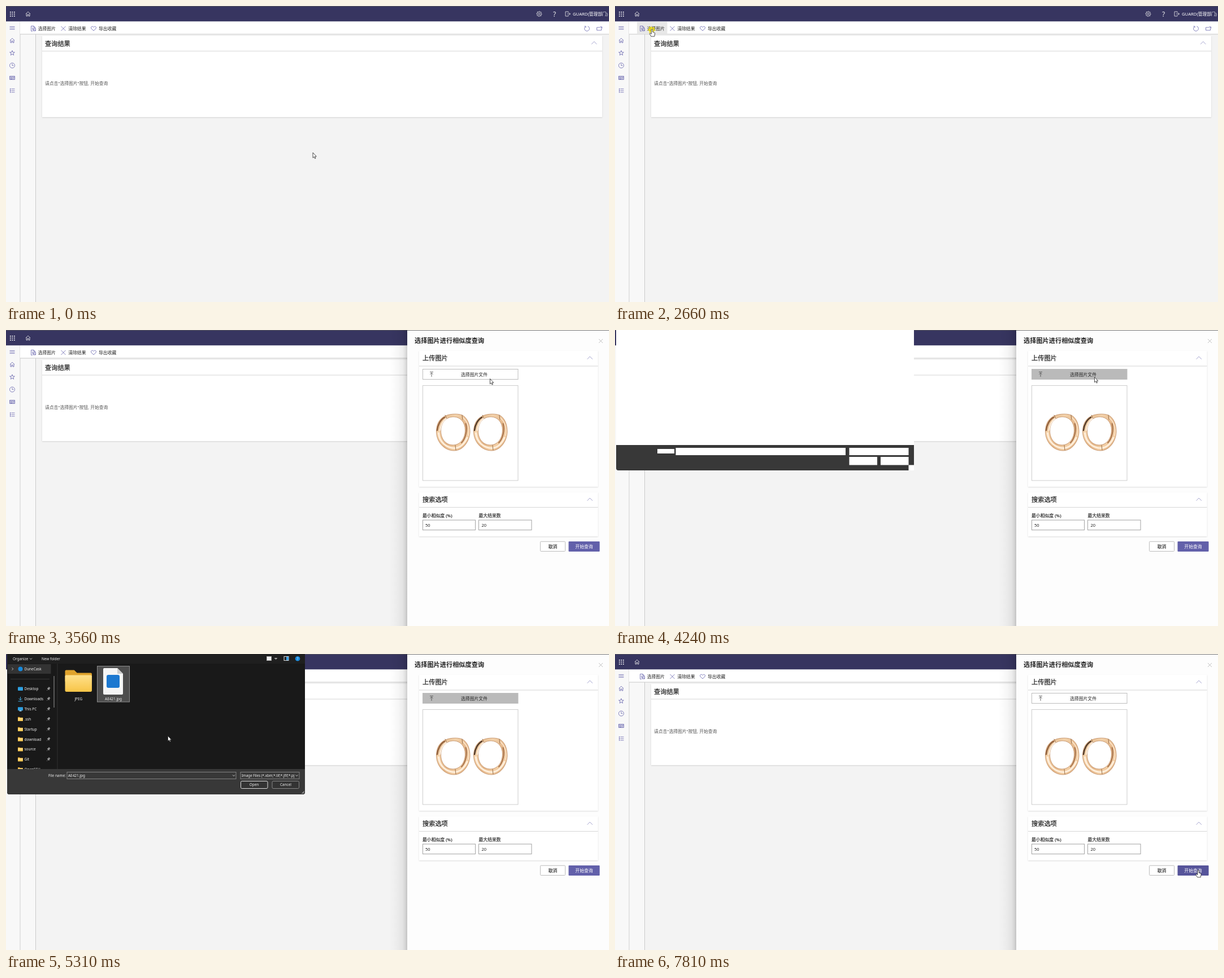
Write an HTML page that moves like this. It is 1067 px wide and 525 px high and loops after 8000 ms.

```html
<!DOCTYPE html>
<html lang="zh">
<head>
<meta charset="utf-8">
<title>图片查询</title>
<style>
html, body { margin: 0; width: 100%; height: 100%; overflow: hidden; background: #f3f3f3; }
svg { display: block; width: 100vw; height: 100vh; }
text { font: 7.85px "Noto Sans", "Noto Sans CJK SC", "Noto Sans CJK", sans-serif; fill: #222; white-space: pre; }
.cjk { font-family: "Noto Sans CJK SC", "Noto Sans CJK", sans-serif; }
.head { font-size: 11.2px; stroke: #222; stroke-width: .25; }
.bold { font-weight: 700; stroke: none; }
.label { stroke: #222; stroke-width: .15; }
.win { font-size: 6.4px; fill: #eee; }
.mid { text-anchor: middle; }
.icon { fill: none; stroke: #6563ad; stroke-width: .8; }
.light { stroke: #eee; }
.thin { stroke: #7f7dbb; stroke-width: .7; }
.gray { stroke: #999; stroke-width: .6; }
.card { fill: #fff; filter: drop-shadow(0 1px 1px #0002); }
</style>
</head>
<body>
<svg id="stage" viewBox="0 0 1067 525" preserveAspectRatio="none"></svg>
<script>
const rect = (x, y, w, h, fill, extra = '') =>
  `<rect x="${x}" y="${y}" width="${w}" height="${h}" fill="${fill}" ${extra}/>`;
const box = (x, y, w, h, fill, stroke, extra = '') =>
  rect(x + .5, y + .5, w - 1, h - 1, fill, `stroke="${stroke}" ${extra}`);
const text = (x, y, s, cls = 'cjk', extra = '') => `<text x="${x}" y="${y}" class="${cls}" ${extra}>${s}</text>`;
const icon = (x, y, d, cls = '') => `<path class="icon ${cls}" transform="translate(${x} ${y})" d="${d}"/>`;
const card = (x, y, w, h, line) =>
  rect(x, y, w, h, '#fff', 'class="card"') + rect(x, line, w, 1, '#d6d6d6') + icon(x + w - 14.3, y + 12.3, CHEVRON, 'thin');
const group = (id, body) => `<g id="${id}">${body}</g>`;
const circle = r => `M${-r},0a${r},${r} 0 1 0 ${2 * r},0a${r},${r} 0 1 0 ${-2 * r},0`;

const CHEVRON = 'M-4.6,2.5L0,-2.3L4.6,2.5';
const HOME = 'M-4,0L0,-3.8L4,0M-3,-1V4H-1V1H1V4H3V-1';
const CROSS = 'M-4,-4L4,4M4,-4L-4,4';
const star = 'M' + Array.from({length: 10}, (_, i) => {
  const r = i % 2 ? 1.9 : 4.6, a = i * Math.PI / 5;
  return [r * Math.sin(a), -r * Math.cos(a)].map(v => v.toFixed(1));
}).join('L') + 'Z';
const gear = 'M' + Array.from({length: 32}, (_, i) => {
  const r = i % 4 < 2 ? 4.6 : 3.5, a = i * Math.PI / 16;
  return [r * Math.cos(a), r * Math.sin(a)].map(v => v.toFixed(1));
}).join('L') + 'Z' + circle(1.6);

function page() {
  let dots = '';
  for (let i = 0; i < 9; i++) dots += rect(7 + i % 3 * 3.5, 10 + Math.floor(i / 3) * 3.5, 1.7, 1.7, '#fff');
  return rect(0, 0, 1067, 525, '#f3f3f3') +
    rect(0, 27, 52, 498, '#f8f8f8') + rect(24.5, 27, 1, 498, '#cfcfcf') + rect(52, 50, 1, 475, '#cacaca') +
    rect(25, 27, 1042, 23, '#fff') + rect(25, 49.5, 1042, 1, '#cacaca') +
    rect(0, 0, 1067, 27.3, '#373560') + rect(0, 0, 1067, 1, '#55555f') + dots +
    icon(39, 14, HOME, 'light') + icon(943.5, 14, gear, 'light') +
    `<text x="970.5" y="18.5" class="mid" style="font-size:12px;fill:#eee">?</text>` +
    icon(994, 14, 'M1,-2V-4H-4V4H1V2M-1,0H4.5M2.5,-2L4.5,0L2.5,2', 'light') +
    text(1003, 17, 'GUARD(管理部门)', '', 'style="font-size:7.7px;fill:#fff"') +
    icon(11, 39, 'M-4.5,-2.5H4.5M-4.5,0H4.5M-4.5,2.5H4.5') + icon(11, 61, HOME) + icon(11, 83.5, star) +
    icon(11, 105.5, circle(4.5) + 'M0,-3V0H2.5') +
    icon(11, 127.5, 'M-4.5,-3H4.5V3H-4.5ZM-4.5,-1.5H4.5M-3,0H0V2H-3ZM1,0H3.5M1,1.6H3.5') +
    icon(11, 150, 'M-4,-3.5H-2.5M-4,0H-2.5M-4,3.5H-2.5M-1.5,-3H4.5M-1.5,0H4.5M-1.5,3H4.5M-3.3,-3V3') +
    group('toolHover', rect(39, 28, 53.5, 21.5, '#e8e8e8')) +
    icon(48, 40, 'M-1,4.5H-3.5V-4.5H1L3.5,-2V0M1,-4.5V-2H3.5M-2,-1H0M-2,1H0M0,0H4.5V4H0ZM0,3L2,1.5L4,4') +
    text(56.7, 42.5, '选择图片') + icon(101.5, 40, CROSS) + text(110.2, 42.5, '清除结果') +
    icon(155, 40, 'M0,4L-4,0C-5.8,-3 -2,-5.5 0,-2.2C2,-5.5 5.8,-3 4,0Z') + text(164, 42.5, '导出收藏') +
    icon(1028, 40, 'M-2.5,-3.6A4.4,4.4 0 1 0 1.5,-4.1M-4.5,-4H-2V-1.5') +
    icon(1050, 40, 'M1,-2H-4.5V3H3.5V0M1,-3H4.5V0M2,-.5L4.5,-3') +
    card(64, 53, 991, 144, 79.5) + text(69, 71, '查询结果', 'cjk head') +
    text(69, 139.5, '请点击"选择图片"按钮, 开始查询', '', 'style="font-size:7.75px;fill:#555"');
}

const earring = (cx, shade) => `<g transform="translate(${cx} 181)">
  <path fill="url(#gold)" stroke="#b57c4e" stroke-width=".7" fill-rule="evenodd"
    d="M-29.5,-2C-29,-17 -22,-25 -13,-29C-4,-33 12,-33 18,-29C27,-23 30,-11 30,0C29,18 17,33 2,33C-16,33 -30,17 -29.5,-2Z
    M-21.5,-2C-21.5,12 -13,23 0,23C13,23 21.5,11 21.5,-4C21.5,-17 13,-27 1,-27C-13,-27 -21.5,-16 -21.5,-2Z"/>
  <g fill="none" stroke-linecap="round">
    <path d="M-25.5,2C-24,18 -12,28 3,28.5C13,28 21,20 25,10" stroke="#ffefdb" stroke-width="3"/>
    <path d="M-28,-3C-27,-13 -22,-22 -15,-26" stroke="${shade}" stroke-width="2.4"/>
    <path d="M-23,-3C-22,-13 -18,-20 -11,-25" stroke="#fff3e4" stroke-width="2"/>
    <path d="M22.5,-15C26,-3 22,12 15,19" stroke="#a06c46" stroke-width="1.8"/>
    <path d="M18,-25C27,-17 29,-5 27,6" stroke="#fae0c2" stroke-width="2"/>
    <path d="M-14,-30L-11,-24M16,-30L17,-22M4,23.5L5,32" stroke="#8d623f" stroke-width=".9"/>
  </g></g>`;

function panel() {
  return rect(678, 0, 32, 525, 'url(#shade)') + rect(710, 0, 357, 525, '#fdfdfd') +
    rect(710, 0, 357, 1, '#777') + text(723, 23, '选择图片进行相似度查询', 'cjk head bold') +
    icon(1052.5, 19.5, 'M-3.5,-3.5L3.5,3.5M3.5,-3.5L-3.5,3.5', 'gray') +
    card(731, 37, 316.5, 241, 63.5) + text(737, 54.3, '上传图片', 'cjk head') +
    box(737, 69, 169.5, 19, '#fff', '#bcbcbc', 'id="pick"') +
    `<path d="M750,74.5H756M753,83V76M750.5,78.5L753,76L755.5,78.5" fill="none" stroke="#444" stroke-width=".8"/>` +
    text(828.5, 81.5, '选择图片文件', 'cjk mid') +
    box(737, 98, 169.5, 169.5, '#fff', '#cdcdcd') + earring(791, '#8f5f3c') + earring(857, '#4e3828') +
    card(731, 288, 316.5, 78, 314) + text(737, 305.3, '搜索选项', 'cjk head') +
    text(737, 332, '最小相似度 (%)', 'label') + text(836.5, 332, '最大结果数', 'cjk label') +
    box(737, 336.6, 94, 18.6, '#fff', '#a2a2a2') + text(742, 349, '50', '', 'style="font-size:7.6px"') +
    box(836, 336.6, 94.5, 18.6, '#fff', '#a2a2a2') + text(841.5, 349, '20', '', 'style="font-size:7.6px"') +
    box(945, 374.7, 45, 18.3, '#fff', '#bcbcbc', 'rx="1"') + text(967.5, 387, '取消', 'cjk mid label') +
    rect(995.5, 375, 55, 18, '#6260aa', 'rx="1" id="go"') + text(1023, 387, '开始查询', 'cjk mid', 'style="fill:#fff"');
}

const folder = (x, y, s) => `<g transform="translate(${x} ${y}) scale(${s})">
  <path d="M0,2Q0,0 2,0H16L21,5H45Q47,5 47,7V20H0Z" fill="#e0a32c"/>${rect(0, 9, 47, 29, 'url(#folder)', 'rx="2"')}</g>`;

function sidebarRow(name, i) {
  const y = 62 + i * 17.85;
  const glyphs = [
    rect(21, y - 3.5, 9, 6.5, '#2f9fe0', 'rx="1"'),
    `<path d="M25.5,${y - 4}V${y + 2}M22.5,${y - 1}L25.5,${y + 2}L28.5,${y - 1}M21.5,${y + 4}H29.5" stroke="#42b0e8" fill="none"/>`,
    rect(21, y - 3.5, 9, 6, '#2f9fe0', 'rx=".5"') + rect(23.5, y + 2, 4, 2, '#8fc8e8')
  ];
  const pin = i < 8 ? `<path d="M72,${y + 3}L74,${y + 1}M73,${y - 1}L76,${y + 2}L76.5,${y}L78,${y - 1.5}L76,${y - 3.5}L74.5,${y - 1.5}Z" stroke="#999" fill="#999" stroke-width=".7"/>` : '';
  return (glyphs[i] || folder(21, y - 3.7, .19)) + text(32.5, y + 2.3, name, 'win') + pin;
}

function dialog() {
  const rows = ['Desktop', 'Downloads', 'This PC', '.ssh', 'Startup', 'download', 'source', 'Git', 'OpenSSH'];
  const down = (x, y) => icon(x, y, 'M-2,-1L0,1L2,-1', 'light');
  return rect(2, 0, 527, 249, '#191919', 'rx="4"') + rect(2, 0, 527, 17, '#1f1f1f') +
    text(12, 10.5, 'Organize', 'win') + down(44, 8.5) + text(63, 10.5, 'New folder', 'win') +
    box(461, 4, 9, 8, '#eee', '#aaa') + icon(477.5, 8.5, 'M-2,-1L0,1L2,-1Z', 'light') +
    box(491.5, 4, 9, 8, '#222', '#ddd') + rect(496, 5, 4, 6, '#3ba0e6') +
    `<circle cx="516" cy="8.3" r="4.3" fill="#168be0"/>` + text(516, 10.7, '?', 'win mid') +
    rect(3, 18, 76.5, 17, '#333') + icon(11.5, 26.5, 'M-1,-2.2L1.2,0L-1,2.2', 'light') +
    `<circle cx="25.5" cy="26.5" r="4" fill="#1689dc"/>` + text(32.5, 28.8, 'DuneCask', 'win') +
    rect(8, 44, 69, .7, '#444') + rows.map(sidebarRow).join('') +
    rect(84.5, 39, 1, 56, '#999') + rect(90.5, 17, 1, 187, '#303030') +
    folder(104.5, 28.5, 1.01) + text(128.3, 82, 'JPEG', 'win mid') +
    group('selection', box(161, 21, 58, 64.5, '#4d4d4d', '#8c8c8c')) +
    `<path d="M174,25H197L207,35V70Q207,72 205,72H174Q172,72 172,70V27Q172,25 174,25Z" fill="#f5f5f5"/>
     <path d="M197,25V35H207Z" fill="#ccc"/>` + rect(178, 37, 23, 23, '#1c78d0', 'rx="3"') +
    text(190, 82, 'AE421.jpg', 'win mid') +
    `<path d="M2,204H529V245Q529,249 525,249H6Q2,249 2,245Z" fill="#383838"/>` +
    text(75, 217.6, 'File name:', 'win') + box(107.5, 209, 300, 13, '#383838', '#828282') +
    group('fileName', text(110, 217.8, 'AE421.jpg', 'win')) + down(403, 215.5) +
    box(414.5, 209, 105, 13, '#383838', '#828282') +
    text(417, 217.8, 'Image Files (*.xbm;*.tif;*.jfif;*.pj', 'win', 'style="font-size:6.2px"') + down(514.5, 215.5) +
    box(415, 225, 48.5, 14, '#333', '#ddd', 'rx="2" id="open"') + text(439, 234.3, 'Open', 'win mid') +
    box(470.5, 225, 48.5, 14, '#333', '#888', 'rx="2"') + text(495, 234.3, 'Cancel', 'win mid') +
    icon(525.5, 245.5, 'M-2,2L2,-2M0,2L2,0', 'light');
}

const blank = () => rect(2, 0, 527, 249, '#383838', 'rx="4"') + rect(2, 0, 527, 204, '#fff') +
  rect(75, 211, 30, 8, '#fff') + rect(107.5, 209, 300.5, 13, '#fff') + rect(414.5, 209, 105, 13, '#fff') +
  rect(414.5, 225, 49.5, 14.5, '#fff') + rect(470, 225, 49.5, 14.5, '#fff') + rect(519.5, 239.5, 9.5, 9.5, '#fff');

const pointer = () => group('flash', '<path d="M-1,-6L1,-3L5,-5L4,-1L7,2L3,3L3,7L-1,5L-5,7L-5,3L-8,1L-5,-2L-6,-5L-2,-4Z" fill="#f2e000" opacity=".75"/>') +
  group('arrow', '<path d="M0,0V9.3L2.1,7.4L3.6,10.6L5,10L3.6,6.9H6.3Z" fill="#fff" stroke="#222" stroke-width=".8"/>') +
  group('hand', '<path d="M-1.2,1A1.2,1.2 0 0 1 1.2,1V4.6L4,5.4Q5.2,5.9 5.1,7.4L4.3,12.5H-1.5L-4.2,8Q-4,6.2 -2.6,7L-1.2,8.2Z" fill="#fff" stroke="#222" stroke-width=".8"/>');

const stage = document.getElementById('stage');
stage.innerHTML = `<defs>
  <linearGradient id="shade"><stop stop-opacity="0"/><stop offset=".25" stop-opacity=".015"/><stop offset=".5" stop-opacity=".035"/>
    <stop offset=".75" stop-opacity=".07"/><stop offset=".88" stop-opacity=".12"/><stop offset="1" stop-opacity=".2"/></linearGradient>
  <linearGradient id="gold" x2=".9" y2="1"><stop stop-color="#d9a877"/><stop offset=".3" stop-color="#f3d2ab"/>
    <stop offset=".6" stop-color="#e3b588"/><stop offset=".8" stop-color="#f3cfa6"/><stop offset="1" stop-color="#cf9a69"/></linearGradient>
  <linearGradient id="folder" x2="0" y2="1"><stop stop-color="#ffe08a"/><stop offset="1" stop-color="#f8c548"/></linearGradient>
  </defs>` + page() + group('panel', panel()) + group('blank', blank()) + group('dialog', dialog()) + group('cursor', pointer());

const el = id => document.getElementById(id);
const show = (id, on) => el(id).style.display = on ? '' : 'none';
const within = (t, a, b) => t >= a && t < b;
const progress = (t, a, b) => Math.min(1, Math.max(0, (t - a) / (b - a)));
const smooth = p => p * p * (3 - 2 * p);

// time, x, y; a fourth value makes the way there linear
const path = [
  [870, 543, 260], [1670, 66, 46], [1740, 66, 45], [1800, 65.5, 41.5], [2690, 65.5, 41.5],
  [3430, 866, 109], [3490, 860, 96, 1], [3560, 856.5, 86.5, 1], [3700, 848.5, 83.5], [4260, 848.5, 83.5],
  [4980, 192, 52], [5100, 192, 52], [5310, 286, 145, 1], [5570, 405, 215, 1], [5790, 439, 235.5],
  [6860, 439, 235.5], [7180, 1059, 401], [7250, 1052, 391], [7350, 1052, 391], [7810, 1032, 383.5], [8000, 1032, 383.5]
];

function cursorAt(t) {
  const i = path.findIndex(k => t < k[0]);
  if (i <= 0) return path[0].slice(1, 3);
  const [a, b] = [path[i - 1], path[i]];
  const p = progress(t, a[0], b[0]), e = b[3] ? p : smooth(p);
  return [a[1] + (b[1] - a[1]) * e, a[2] + (b[2] - a[2]) * e];
}

function draw(now) {
  const t = now % 8000, [x, y] = cursorAt(t);
  const hand = within(t, 1740, 2760) || (t >= 7400 && x < 1050);
  el('cursor').setAttribute('transform', `translate(${x} ${y})`);
  show('hand', hand);
  show('arrow', !hand);
  show('flash', [2660, 3850, 5060, 5920].some(c => within(t, c, c + 70)));
  show('toolHover', within(t, 1600, 2760));

  show('panel', t >= 2800);
  el('panel').setAttribute('transform', `translate(${390 * (1 - smooth(progress(t, 2800, 3000)))} 0)`);
  el('pick').setAttribute('fill', within(t, 3850, 7050) ? '#bababa' : within(t, 3600, 3850) ? '#eee' : '#fff');
  el('go').setAttribute('fill', hand && t > 7000 ? '#56549a' : '#6260aa');

  show('blank', within(t, 4240, 4310));
  show('dialog', within(t, 4310, 6180));
  el('dialog').style.opacity = 1 - progress(t, 6020, 6170);
  show('selection', t >= 5060);
  show('fileName', t >= 5060);
  el('open').setAttribute('fill', t > 5640 ? '#454545' : '#333');
}

const start = performance.now();
(function loop() {
  draw(performance.now() - start);
  requestAnimationFrame(loop);
})();
</script>
</body>
</html>
```
